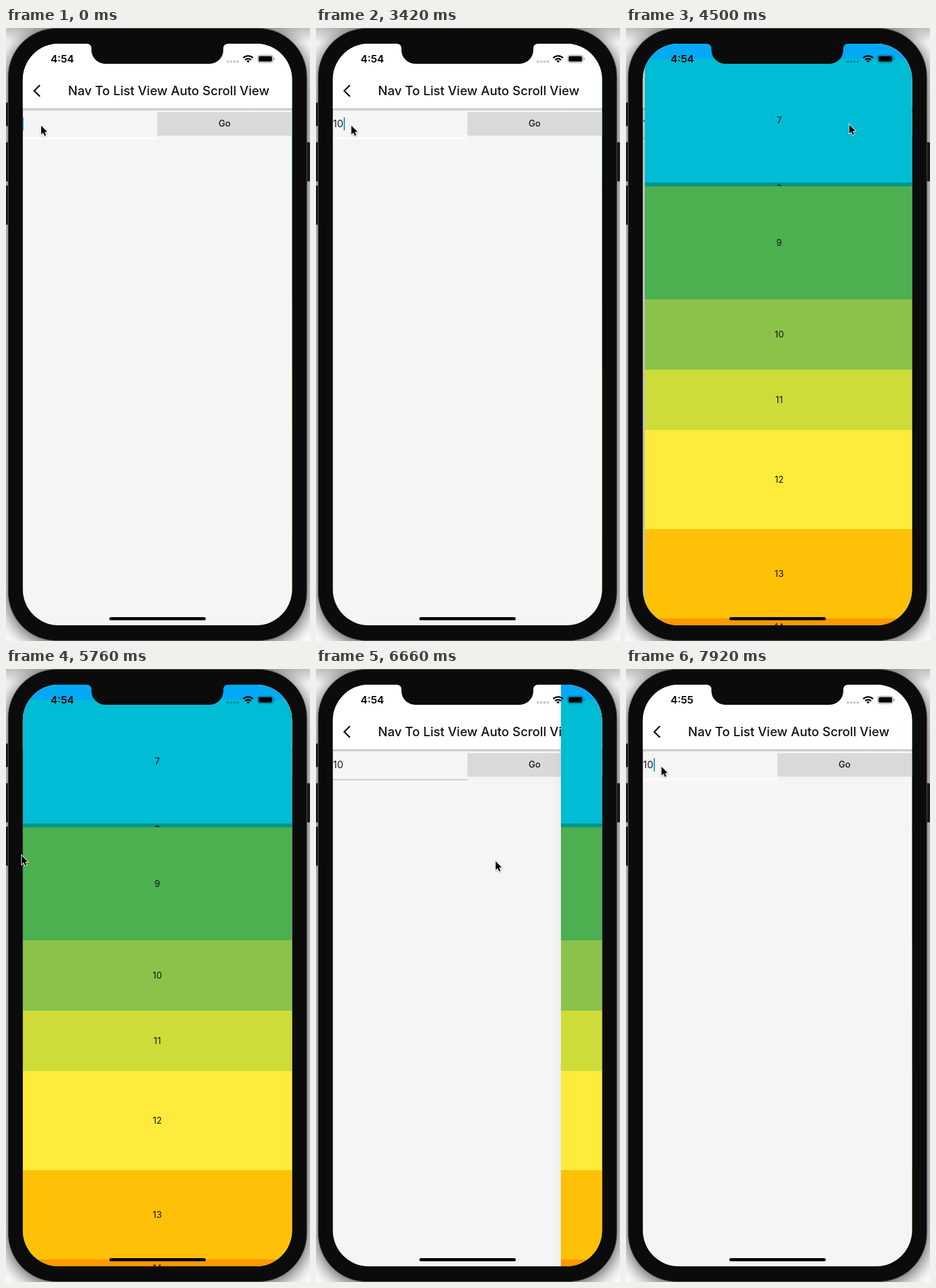
Recreate the animation shown at these times as an HTML page. Size 484x976 px, loop 8000 ms.

```html
<!DOCTYPE html>
<html lang="en">
<head>
<meta charset="utf-8">
<title>Auto scroll list</title>
<style>
@property --p { syntax: "<number>"; inherits: true; initial-value: 1; }
html, body { margin: 0; width: 100%; height: 100%; overflow: hidden; background: #fff; }
svg { display: block; width: 484px; height: 976px; }
text { font-family: Inter, "Open Sans", sans-serif; font-size: 14px; fill: #111; }
.mid { text-anchor: middle; }
.clock { font-size: 16.5px; font-weight: 600; fill: #000; }
.title { font-size: 20px; font-weight: 500; }
.typed { font-size: 16px; fill: #222; }
#rows text { letter-spacing: .25px; }

.anim { animation: 8s linear infinite; }
.step { animation-timing-function: step-end; }

/* --p is the share of the screen width the list is pushed out by */
#list { animation-name: slide; transform: translateX(round(calc(var(--p) * 428px), 1px)); }
#edge { opacity: calc(1 - var(--p)); }
@keyframes slide {
  0% { --p: 1; }
  51.87% { --p: 1; animation-timing-function: cubic-bezier(.35, .91, .33, .97); }
  56.87%, 79.4% { --p: 0; }
  81% { --p: .264; }
  82.1% { --p: .53; }
  83.25% { --p: .846; animation-timing-function: cubic-bezier(.12, .65, .3, 1); }
  88.5%, 100% { --p: 1; }
}

#pointer { animation-name: move; }
@keyframes move {
  0%, 42.75% { transform: translate(56px, 155.5px); }
  43.5% { transform: translate(72px, 149px); }
  45% { transform: translate(200px, 128px); }
  46.5% { transform: translate(325px, 140px); }
  48%, 66% { transform: translate(355.5px, 154px); }
  67.5% { transform: translate(330px, 250px); }
  69% { transform: translate(220px, 440px); }
  69.75% { transform: translate(150px, 460px); }
  70.5% { transform: translate(80px, 415px); }
  72%, 78.75% { transform: translate(25px, 297px); }
  79.5% { transform: translate(52px, 301px); }
  81% { transform: translate(219.5px, 313.5px); }
  82% { transform: translate(272px, 309px); }
  83.25% { transform: translate(286px, 306px); }
  89.25% { transform: translate(286px, 306px); animation-timing-function: ease-in-out; }
  95.25%, 100% { transform: translate(56.5px, 155.5px); }
}
#ring { animation-name: press; }
@keyframes press {
  0% { opacity: 0; } 49.5% { opacity: 1; } 51.75% { opacity: 0; }
  78.75% { opacity: 1; } 82.25%, 100% { opacity: 0; }
}

#blink { animation-name: blink; }
@keyframes blink {
  0%, 5% { opacity: 1; }
  8.25%, 11% { opacity: 0; }
  13.5%, 15.5% { opacity: 1; }
  18%, 25.49% { opacity: 0; }
  25.5%, 33.25% { opacity: 1; }
  35.25%, 38% { opacity: 0; }
  40.5%, 44.5% { opacity: 1; }
  46.75%, 88.5% { opacity: 0; }
  91%, 100% { opacity: 1; }
}
#caret { animation-name: advance; }
@keyframes advance {
  0% { transform: none; } 25.5% { transform: translateX(9px); }
  27%, 100% { transform: translateX(18px); }
}
#one { animation-name: one; }
@keyframes one { 0% { opacity: 0; } 25.5% { opacity: 1; } 27%, 100% { opacity: 0; } }
#ten { animation-name: ten; }
@keyframes ten { 0% { opacity: 0; } 27%, 100% { opacity: 1; } }

#focus { animation-name: focus; }
#blur { animation-name: blur; }
@keyframes focus { 0% { opacity: 1; } 51.5% { opacity: 0; } 88.5%, 100% { opacity: 1; } }
@keyframes blur { 0% { opacity: 0; } 51.5% { opacity: 1; } 88.5%, 100% { opacity: 0; } }

#before { animation-name: before; }
#after { animation-name: after; }
@keyframes before { 0% { opacity: 1; } 94.5%, 100% { opacity: 0; } }
@keyframes after { 0% { opacity: 0; } 94.5%, 100% { opacity: 1; } }
</style>
</head>
<body>
<svg viewBox="0 0 484 976">
  <defs>
    <clipPath id="screen"><rect x="26.8" y="25" width="428.6" height="926" rx="57"/></clipPath>
    <filter id="soft" x="-20%" y="-20%" width="140%" height="140%"><feGaussianBlur stdDeviation="16"/></filter>
    <filter id="drop" x="-50%" y="-50%" width="200%" height="200%">
      <feDropShadow dx="0" dy="1" stdDeviation="1" flood-opacity=".3"/>
    </filter>
    <linearGradient id="down" x2="0" y2="1">
      <stop stop-opacity=".25"/><stop offset="1" stop-opacity="0"/>
    </linearGradient>
    <linearGradient id="side">
      <stop stop-opacity="0"/><stop offset=".6" stop-opacity=".07"/><stop offset="1" stop-opacity=".24"/>
    </linearGradient>
  </defs>

  <!-- phone body -->
  <rect width="484" height="976" fill="#fff"/>
  <rect x="4" y="6" width="475" height="974" rx="76" opacity=".8" filter="url(#soft)"/>
  <rect width="484" height="24" fill="url(#down)"/>
  <g fill="#161616" stroke="#3c3c3c" stroke-width=".6">
    <rect x="-2" y="119" width="8" height="37" rx="1"/>
    <rect x="-2" y="182" width="8" height="62" rx="1"/>
    <rect x="-2" y="251" width="8" height="62" rx="1"/>
    <rect x="477" y="182" width="7" height="62" rx="1"/>
  </g>
  <rect x="3.5" y=".5" width="475.5" height="975" rx="77" fill="#0b0b0b" stroke="#555"/>

  <g clip-path="url(#screen)">
    <!-- form page -->
    <rect x="26" y="25" width="430" height="926" fill="#f5f5f5"/>
    <rect x="26" y="128" width="430" height="4.5" fill="url(#down)"/>
    <rect x="26" y="25" width="430" height="103" fill="#fff"/>
    <path d="M54 91l-9 9 9 9" fill="none" stroke="#000" stroke-width="2.4"/>
    <text class="mid title" x="259" y="107">Nav To List View Auto Scroll View</text>
    <rect x="241" y="134" width="216" height="37.5" rx="2" fill="#d9d9d9"/>
    <text class="mid" x="348" y="157" font-weight="500">Go</text>
    <text id="one" class="typed anim step" x="27" y="158">1</text>
    <text id="ten" class="typed anim step" x="27" y="158">10</text>
    <g id="blink" class="anim"><rect id="caret" class="anim step" x="26" y="142" width="2" height="21" fill="#2196f3"/></g>
    <rect id="focus" class="anim step" x="27" y="174.5" width="214" height="2.5" fill="#fff"/>
    <rect id="blur" class="anim step" x="27" y="175.5" width="214" height="1.3" fill="#b8b8b8"/>

    <g id="list" class="anim">
      <rect id="edge" x="6" y="25" width="21" height="926" fill="url(#side)"/>
      <g id="rows"></g>
    </g>

    <!-- status bar -->
    <text id="before" class="clock anim step" x="71" y="55">4:54</text>
    <text id="after" class="clock anim step" x="71" y="55">4:55</text>
    <g opacity=".23">
      <circle cx="353.2" cy="53.5" r="2"/><circle cx="358.5" cy="53.5" r="2"/>
      <circle cx="363.8" cy="53.5" r="2"/><circle cx="369.1" cy="53.5" r="2"/>
    </g>
    <path d="M377.8 47.6a10.8 10.8 0 0 1 15.4 0M380.8 50.8a6.6 6.6 0 0 1 9.4 0" fill="none" stroke="#000" stroke-width="2.4"/>
    <path d="M385.5 55.3l-2.5-2.6a3.6 3.6 0 0 1 5 0z"/>
    <rect x="400.7" y="43.3" width="24.4" height="11.8" rx="3.4" fill="none" stroke="#000" stroke-opacity=".4"/>
    <rect x="402.2" y="44.8" width="21.4" height="8.8" rx="2"/>
    <path d="M426.4 47.2q1.6.6 1.6 2t-1.6 2z" opacity=".45"/>
    <rect x="164.5" y="938" width="153.5" height="5" rx="2.5"/>
  </g>
  <path d="M128 24v1q8 0 8 8v2a22 22 0 0 0 22 22h166a22 22 0 0 0 22-22v-2q0-8 8-8v-1z" fill="#0b0b0b"/>

  <g id="pointer" class="anim">
    <g id="ring" class="anim step" fill="none">
      <circle cx=".5" cy=".5" r="20" stroke="#fff" stroke-width="5"/>
      <circle cx=".5" cy=".5" r="20" stroke="#000" stroke-width="3"/>
    </g>
    <path d="M0 0v14l3.2-3 2.3 5.2 2.3-1-2.3-5.1h4.4z" stroke="#fff" stroke-width="1.8" paint-order="stroke" filter="url(#drop)"/>
  </g>
</svg>
<script>
// [top, colour, label baseline]
const rows = [
  [25, '#03a9f4', 31], [49, '#00bcd4', 152], [246, '#009688', 259.5],
  [252, '#4caf50', 347], [432, '#8bc34a', 493], [544, '#cddc39', 597],
  [640, '#ffeb3b', 724], [798, '#ffc107', 874], [940, '#ff9800', 959]
];
// Later rows cover labels that overflow a short one.
document.getElementById('rows').innerHTML = rows.map(([top, fill, base], i) =>
  `<rect x="27" y="${top}" width="429" height="${951 - top}" fill="${fill}"/>
   <text class="mid" x="241" y="${base}">${i + 6}</text>`).join('');
</script>
</body>
</html>
```
